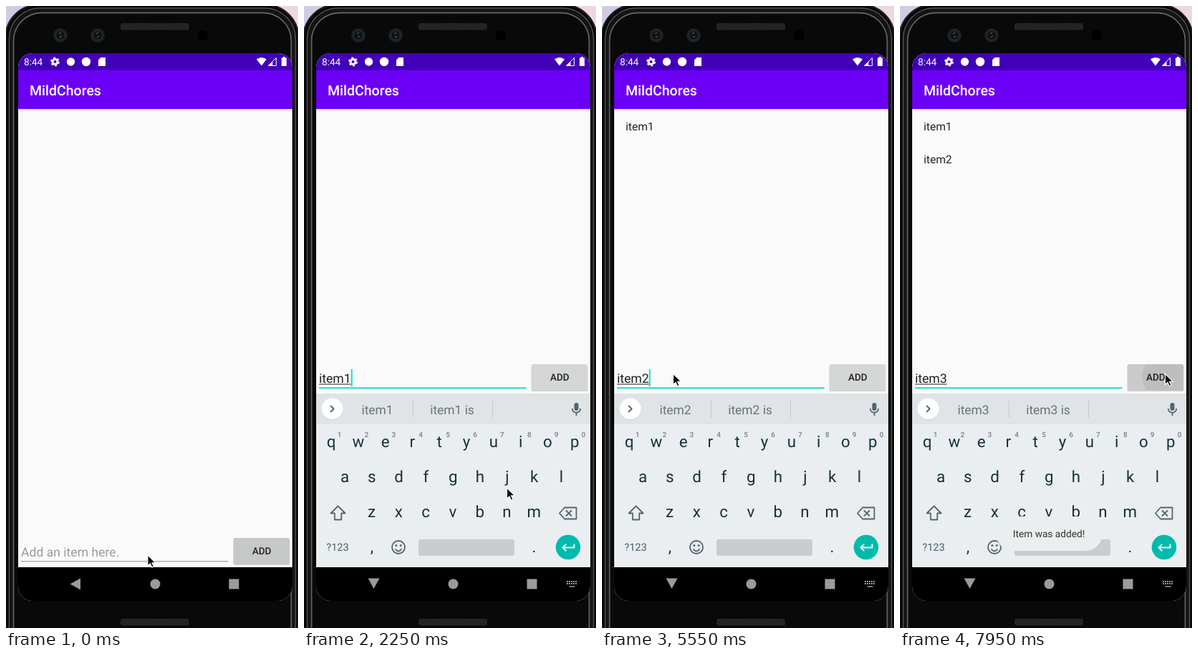
An HTML page for the animation above (8000 ms loop, 408 by 870 pixels).

```html
<!DOCTYPE html>
<html lang="en">
<head>
<meta charset="utf-8">
<title>To-do list demo</title>
<style>
html, body { margin: 0; width: 100%; height: 100%; overflow: hidden; background: #d3cde2; }
svg { display: block; width: 408px; height: 870px; font-family: Roboto, sans-serif; text-rendering: geometricPrecision; }
.mid { text-anchor: middle; }
.key { font-size: 22.3px; fill: #17313b; }
.sup { font-size: 10px; font-weight: 500; fill: #768186; }
.line { fill: none; stroke: #53656d; stroke-width: 1.8; stroke-linejoin: round; }
.sug { font-size: 17.4px; fill: #67747b; }
.field { font-size: 17.6px; }
.item { font-size: 15.6px; fill: #222; }
.accent { fill: #10e0ce; }
</style>
</head>
<body>
<svg viewBox="0 0 408 870">
  <defs>
    <clipPath id="screen"><rect x="17" y="66" width="383" height="766" rx="20"/></clipPath>
    <clipPath id="btnClip"><rect x="318" y="501" width="78" height="36.500" rx="2"/></clipPath>
    <linearGradient id="shade" x2="0" y2="1">
      <stop stop-color="#000" stop-opacity=".13"/><stop offset="1" stop-color="#000" stop-opacity="0"/>
    </linearGradient>
    <linearGradient id="desk">
      <stop stop-color="#d0cbe2"/><stop offset="1" stop-color="#ecd8e2"/>
    </linearGradient>
    <pattern id="mesh" width="4" height="4" patternUnits="userSpaceOnUse">
      <rect width="4" height="4" fill="#2b2b2b"/><path d="M0 0h2v2h-2zM2 2h2v2h-2z" fill="#1d1d1d"/>
    </pattern>
  </defs>

  <rect width="408" height="60" fill="url(#desk)"/>
  <g id="phone" fill="none">
    <rect x="-1" y="-2" width="410" height="960" rx="47" fill="#090909" stroke="#202020" stroke-width="2"/>
    <rect x="4.500" y="3" width="400" height="960" rx="43" stroke="#555" stroke-width="1.500"/>
    <rect x="7.500" y="6" width="394" height="960" rx="41" stroke="#161616" stroke-width="3"/>
    <rect x="10.500" y="9.500" width="388" height="960" rx="39" stroke="#626262" stroke-width="1.800"/>
    <rect x="160" y="24" width="96" height="9.500" rx="3" fill="url(#mesh)"/>
    <rect x="160" y="857" width="96" height="9.500" rx="3" fill="url(#mesh)"/>
    <circle cx="275" cy="41" r="7.500" fill="#000"/>
  </g>

  <g clip-path="url(#screen)">
    <rect x="17" y="66" width="383" height="766" fill="#fafafa"/>
    <rect x="17" y="66" width="383" height="24" fill="#4200b9"/>
    <rect x="17" y="90" width="383" height="54" fill="#6c00f7"/>
    <rect x="17" y="144" width="383" height="4" fill="url(#shade)"/>
    <g id="status" fill="#fff">
      <text x="25" y="83" font-size="13.6">8:44</text>
      <circle cx="68.500" cy="78" r="3.500" fill="none" stroke="#fff" stroke-width="3"/>
      <circle cx="68.500" cy="78" r="5.400" fill="none" stroke="#fff" stroke-width="2" stroke-dasharray="2.800 2.850"/>
      <circle cx="90.500" cy="78" r="5.700"/>
      <circle cx="112" cy="78" r="6.200"/>
      <path d="M132.500 72h6.500v12h-10v-8.500z"/>
      <path d="M350 74.500q7-5 14 0l-7 9z"/>
      <path d="M366.500 83.500L377.500 72.500V83.500z" fill="none" stroke="#fff"/>
      <path d="M366.500 83.500l6-6v6z"/>
      <path d="M385 72.500h2v-1.500h3v1.500h2v11.500h-7z"/>
    </g>
    <text x="33" y="124.500" font-size="19.5" font-weight="500" fill="#fff">MildChores</text>
    <text id="item1" class="item" x="33" y="173.500">item1</text>
    <text id="item2" class="item" x="33" y="220">item2</text>

    <g id="row">
      <text id="hint" class="field" x="21" y="526.500" fill="#9b9b9b">Add an item here.</text>
      <text id="typed" class="field" x="21" y="526.500" fill="#222"></text>
      <rect id="compose" x="21" y="528.500" height="1" fill="#222"/>
      <rect id="rule" x="21" y="533.300" width="289.500"/>
      <rect id="caret" class="accent" y="508" width="2" height="24"/>
      <rect x="317.500" y="502.500" width="79" height="36.500" rx="2" fill="#000" opacity=".18"/>
      <rect x="318" y="501" width="78" height="36.500" rx="2" fill="#d5d7d6"/>
      <g clip-path="url(#btnClip)">
        <rect id="press" x="318" y="501" width="78" height="37"/>
        <circle id="ripple" r="32" opacity=".06"/>
      </g>
      <text class="mid" x="357.300" y="524" font-size="13.6" font-weight="500" fill="#222">ADD</text>
    </g>

    <g id="nav" fill="#9b9b9b">
      <rect x="17" y="785" width="383" height="47" fill="#000"/>
      <path id="back" d="M-7.500 0L7 -8V8z"/>
      <circle cx="208.500" cy="808.500" r="7"/>
      <rect x="311.500" y="801.500" width="14" height="14"/>
      <g id="kbdIcon">
        <path d="M367 805h15M367 808h15" stroke="#9b9b9b" stroke-width="2" stroke-dasharray="2 1"/>
        <path d="M370.500 812h8" stroke="#9b9b9b" stroke-width="1.500"/>
      </g>
    </g>

    <g id="kbd">
      <rect x="17" y="542" width="383" height="243" fill="#eaeef0"/>
      <rect x="17" y="542" width="383" height="43" fill="#e0e4e7"/>
      <circle cx="39.500" cy="564.500" r="15" fill="#000" opacity=".1"/>
      <circle cx="39.500" cy="563.500" r="15" fill="#fff"/>
      <path id="chev" class="line" d="M-2.500 -4.500L2 0l-4.500 4.500"/>
      <g id="mic">
        <rect x="377.500" y="555" width="6" height="11" rx="3" fill="#53656d"/>
        <path class="line" d="M374.800 563c0 7.500 11.400 7.500 11.400 0M380.500 569v4"/>
      </g>
      <g id="tools">
        <g class="line">
          <circle cx="89" cy="562" r="5"/><path d="M92.500 566l6 6"/>
          <path d="M139 557h14.500v9l-5 5H139zM153 566h-4.500v5M142.500 564q3.500 5 7 0M143 560.500h1.500M148 560.500h1.500"/>
        </g>
        <text class="mid" x="201" y="569" font-size="15" font-weight="900" fill="#53656d">GIF</text>
        <rect x="250.500" y="556.500" width="15" height="15" fill="#6a787f"/>
        <path d="M292 553v21" stroke="#c9ced1"/>
        <g fill="#53656d"><circle cx="320.500" cy="563.500" r="2"/><circle cx="326.500" cy="563.500" r="2"/><circle cx="332.500" cy="563.500" r="2"/></g>
      </g>
      <g id="sugs">
        <path d="M152.500 552v24M263.500 552v24" stroke="#c3c9cc"/>
        <text class="sug mid" x="102.500" y="570.500"></text>
        <text class="sug mid" x="207" y="570.500"></text>
        <text class="sug mid" x="312" y="570.500"></text>
      </g>
      <g id="keys"></g>
      <path class="line" d="M47.500 699.500l10 10h-5.300v9h-9.400v-9h-5.300z"/>
      <path class="line" d="M364 701.500h16.500v16H364l-7-8zM366 705.500l8 8m0-8l-8 8"/>
      <text class="mid" x="47" y="762" font-size="14.5" fill="#4b5f68">?123</text>
      <circle class="line" cx="132" cy="757" r="9"/>
      <path class="line" d="M127.500 759.500q4.500 6 9 0"/>
      <g fill="#53656d"><circle cx="128.800" cy="754.500" r="1.500"/><circle cx="135.200" cy="754.500" r="1.500"/></g>
      <rect x="160" y="746" width="134" height="23" rx="3" fill="#c8cdd1"/>
      <circle cx="369" cy="757" r="17.300" fill="#00bbac"/>
      <path d="M377.500 752.500v5h-16m4.800-4.800l-4.800 4.800 4.800 4.800" fill="none" stroke="#fff" stroke-width="1.800"/>
    </g>
    <g id="toast">
      <rect x="134" y="714" width="149" height="48" rx="24" fill="#ebeeef"/>
      <text class="mid" x="208" y="743" font-size="13.7" fill="#333">Item was added!</text>
    </g>
  </g>
  <path id="mouse" d="M0 0v15l3.500-3.200 2.400 5.500 2.500-1.100-2.400-5.300h5z" stroke="#fff" stroke-width="1.100"/>
</svg>
<script>
const LOOP = 8000, TICK = 150;
const $ = id => document.getElementById(id);
const set = (id, attrs) => { for (const k in attrs) $(id).setAttribute(k, attrs[k]); };
const show = (id, on) => { $(id).style.display = on ? '' : 'none'; };

// Static parts that repeat
const label = (cls, x, y, s) => `<text class="${cls} mid" x="${x}" y="${y}">${s}</text>`;
const letters = (s, x, y) => [...s].map((c, i) => label('key', x + i * 37.8, y, c)).join('');
$('keys').innerHTML = letters('qwertyuiop', 38, 617) + letters('asdfghjkl', 57, 666) +
  letters('zxcvbnm', 94.5, 715) + label('key', 95, 764, ',') + label('key', 321.5, 764, '.') +
  [...'1234567890'].map((c, i) => label('sup', 49.5 + i * 37.9, 602.5, c)).join('');
$('phone').innerHTML += [76, 128].map(x =>
  `<circle cx="${x}" cy="41" r="10" fill="#1b2023"/><circle cx="${x}" cy="41" r="6.500" fill="#0e1214" stroke="#2b3236"/>
   <path d="M${x - 2} 39l3-2M${x - 1} 44l3-2" stroke="#4c5960" stroke-width="1.500"/>`).join('');

// Each step overrides the state from its time on
const start = { kbd: 0, focus: false, text: '', bar: 'none', items: 0, toast: 0, caret: false, press: .07, ripple: false };
const steps = [
  [900, { focus: true, caret: true }],
  [1050, { kbd: .7, press: 0 }],
  [1200, { kbd: 1 }],
  [1500, { text: 'i', bar: ['i', 'I', 'in'] }],
  [1650, { text: 'it', bar: ['it', "it's", 'its'] }],
  [1800, { text: 'ite', bar: ['ite', 'item', 'items'] }],
  [1950, { text: 'item', bar: ['item', 'items', 'item is'] }],
  [2100, { text: 'item1', bar: ['item1', 'item1 is', ''] }],
  [2700, { caret: false }],
  [3150, { press: .06, ripple: true }],
  [3300, { press: .13, ripple: false, text: '', bar: 'none', items: 1, toast: .4, caret: true }],
  [3450, { press: .05, bar: 'tools', toast: 1 }],
  [3600, { press: 0, caret: false }],
  [3750, { caret: true }],
  [4200, { caret: false }],
  [4650, { caret: true, text: 'i', bar: ['i', 'I', 'in'] }],
  [4800, { text: 'it', bar: ['it', "it's", 'its'] }],
  [4950, { text: 'ite', bar: ['ite', 'item', 'items'] }],
  [5100, { text: 'item', bar: ['item', 'items', 'item is'] }],
  [5250, { text: 'item2', bar: ['item2', 'item2 is', ''] }],
  [5400, { toast: .5 }],
  [5550, { toast: 0 }],
  [5850, { caret: false }],
  [6000, { press: .06, ripple: true }],
  [6150, { press: .13, ripple: false, text: '', bar: 'none', items: 2, toast: .4, caret: true }],
  [6300, { press: .05, bar: 'tools', toast: 1 }],
  [6450, { press: 0 }],
  [6600, { caret: false }],
  [6750, { caret: true, text: 'i', bar: ['i', 'I', 'in'] }],
  [6900, { text: 'it', bar: ['it', "it's", 'its'] }],
  [7050, { text: 'item', bar: ['item', 'items', 'item is'] }],
  [7350, { text: 'item3', bar: ['item3', 'item3 is', ''] }],
  [7800, { caret: false }],
  [7950, { press: .06, ripple: true }]
];

// Pointer path: time, x, y
const path = [
  [0, 198, 768], [150, 198, 768], [600, 83.5, 747], [1650, 83.5, 747], [2250, 283.5, 674],
  [2400, 288, 667], [2700, 397, 560], [2850, 375, 518], [3150, 375, 518], [3600, 137.5, 486.5],
  [3900, 99.5, 514.5], [5550, 99.5, 514.5], [6000, 334.5, 518.5], [7350, 334.5, 518.5], [7800, 370.5, 514.5], [8000, 370.5, 514.5]
];

function pointer(t) {
  const i = Math.max(1, path.findIndex(p => p[0] >= t));
  const [t0, x0, y0] = path[i - 1], [t1, x1, y1] = path[i];
  const k = (t - t0) / (t1 - t0);
  return [x0 + (x1 - x0) * k, y0 + (y1 - y0) * k];
}

function draw(t) {
  const s = { ...start };
  for (const [at, change] of steps) if (at <= t) Object.assign(s, change);
  const [x, y] = pointer(t);

  set('mouse', { transform: `translate(${x} ${y})` });
  set('row', { transform: `translate(0 ${s.kbd ? 0 : 243})` });
  set('rule', s.focus ? { height: 2, class: 'accent' } : { height: 1.1, class: '', fill: '#929292' });
  set('press', { opacity: s.press });
  set('ripple', { cx: x, cy: y + 4 });
  show('ripple', s.ripple);

  $('typed').textContent = s.text;
  const width = s.text ? $('typed').getComputedTextLength() : 0;
  set('compose', { width });
  set('caret', { x: 21 + width });
  show('caret', s.caret);
  show('hint', !s.text);
  show('item1', s.items > 0);
  show('item2', s.items > 1);

  const moving = s.kbd > 0 && s.kbd < 1;
  set('kbd', { opacity: s.kbd, transform: `translate(0 ${moving ? 26 : 0})` });
  set('back', {
    transform: moving ? 'translate(100 807) rotate(175)' :
      s.kbd ? 'translate(97.500 807.500) rotate(-90)' : 'translate(97 808.500)'
  });
  show('kbdIcon', s.kbd);

  const words = Array.isArray(s.bar);
  set('chev', { transform: `translate(39.500 563.500) scale(${s.bar === 'tools' ? -1 : 1} 1)` });
  show('tools', s.bar === 'tools');
  show('sugs', words);
  if (words) document.querySelectorAll('.sug').forEach((el, i) => { el.textContent = s.bar[i]; });
  set('toast', { opacity: s.toast });
}

let last = -1;
function tick() {
  const t = Math.floor(performance.now() % LOOP / TICK) * TICK;
  if (t !== last) draw(last = t);
  requestAnimationFrame(tick);
}
tick();
</script>
</body>
</html>
```
